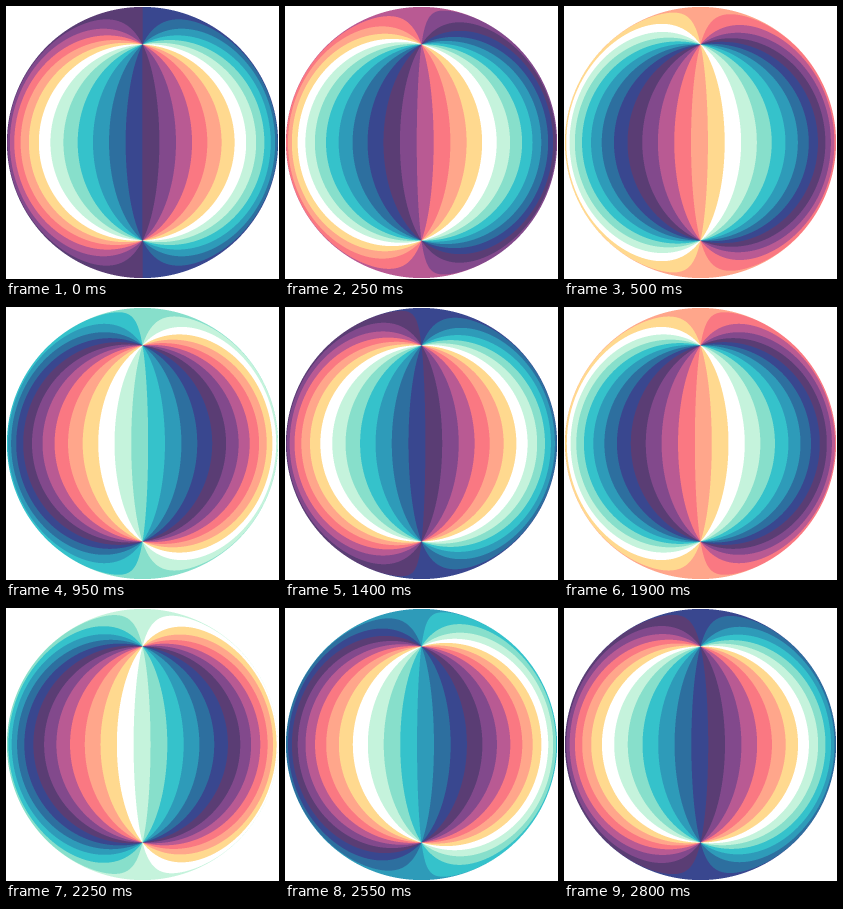
Recreate the animation shown at these times as an HTML page with a canvas. Size 273 by 273 pixels, loop 2.85 s.

```html
<!DOCTYPE html>
<html lang="en">
<head>
<meta charset="utf-8">
<title>Mirror ball</title>
<style>
  html, body { margin: 0; width: 100%; height: 100%; overflow: hidden; background: #fff; }
  canvas { display: block; }
</style>
</head>
<body>
<canvas width="273" height="273"></canvas>
<script>
const SIZE = 273, CENTER = 136.5, RADIUS = 135.6;
const EYE = 15;            // camera distance in ball radii
const STEP = 50, STEPS = 57;
const GRID = 3;            // samples per pixel side
const COLORS = ['#5a3d74', '#82498c', '#b95a93', '#fa7882', '#ffa68b', '#ffd98f', '#ffffff',
  '#c5f3dc', '#87dfcb', '#35c2cb', '#2e9bb9', '#2d6f9f', '#39478f'];
const N = COLORS.length;
const rgb = COLORS.map(c => [1, 3, 5].map(i => parseInt(c.slice(i, i + 2), 16)));

const ctx = document.querySelector('canvas').getContext('2d');
const image = ctx.createImageData(SIZE, SIZE);

// Longitude, in bands, of the surroundings mirrored at a point of the ball.
function bandAt(x, y) {
  const r = Math.hypot(x, y) / RADIUS;
  if (r >= 1) return NaN;
  const view = Math.atan(r / Math.sqrt(EYE * EYE - 1));
  const turn = 2 * Math.asin(Math.min(1, EYE * Math.sin(view))) - view;
  const side = r ? Math.sin(turn) * x / (r * RADIUS) : 0;
  return Math.atan2(side, Math.cos(turn)) / Math.PI * N;
}

const samples = new Float32Array(SIZE * SIZE * GRID * GRID);
let n = 0;
for (let y = 0; y < SIZE; y++)
  for (let x = 0; x < SIZE; x++)
    for (let j = 0; j < GRID; j++)
      for (let i = 0; i < GRID; i++)
        samples[n++] = bandAt(x + (i + 0.5) / GRID - CENTER, y + (j + 0.5) / GRID - CENTER);

function draw(step) {
  const shift = 2 * N * step / STEPS + 2 * N;
  const per = GRID * GRID, data = image.data;
  for (let p = 0, s = 0; p < data.length; p += 4) {
    let r = 0, g = 0, b = 0;
    for (let k = 0; k < per; k++) {
      const band = samples[s++];
      if (band !== band) { r += 255; g += 255; b += 255; continue; }
      const c = rgb[Math.floor(band + shift) % N];
      r += c[0]; g += c[1]; b += c[2];
    }
    data[p] = r / per;
    data[p + 1] = g / per;
    data[p + 2] = b / per;
    data[p + 3] = 255;
  }
  ctx.putImageData(image, 0, 0);
}

let shown = -1;
const start = performance.now();
function tick(now) {
  const step = Math.floor(Math.max(0, now - start) / STEP) % STEPS;
  if (step !== shown) draw(shown = step);
  requestAnimationFrame(tick);
}
tick(start);
</script>
</body>
</html>
```
